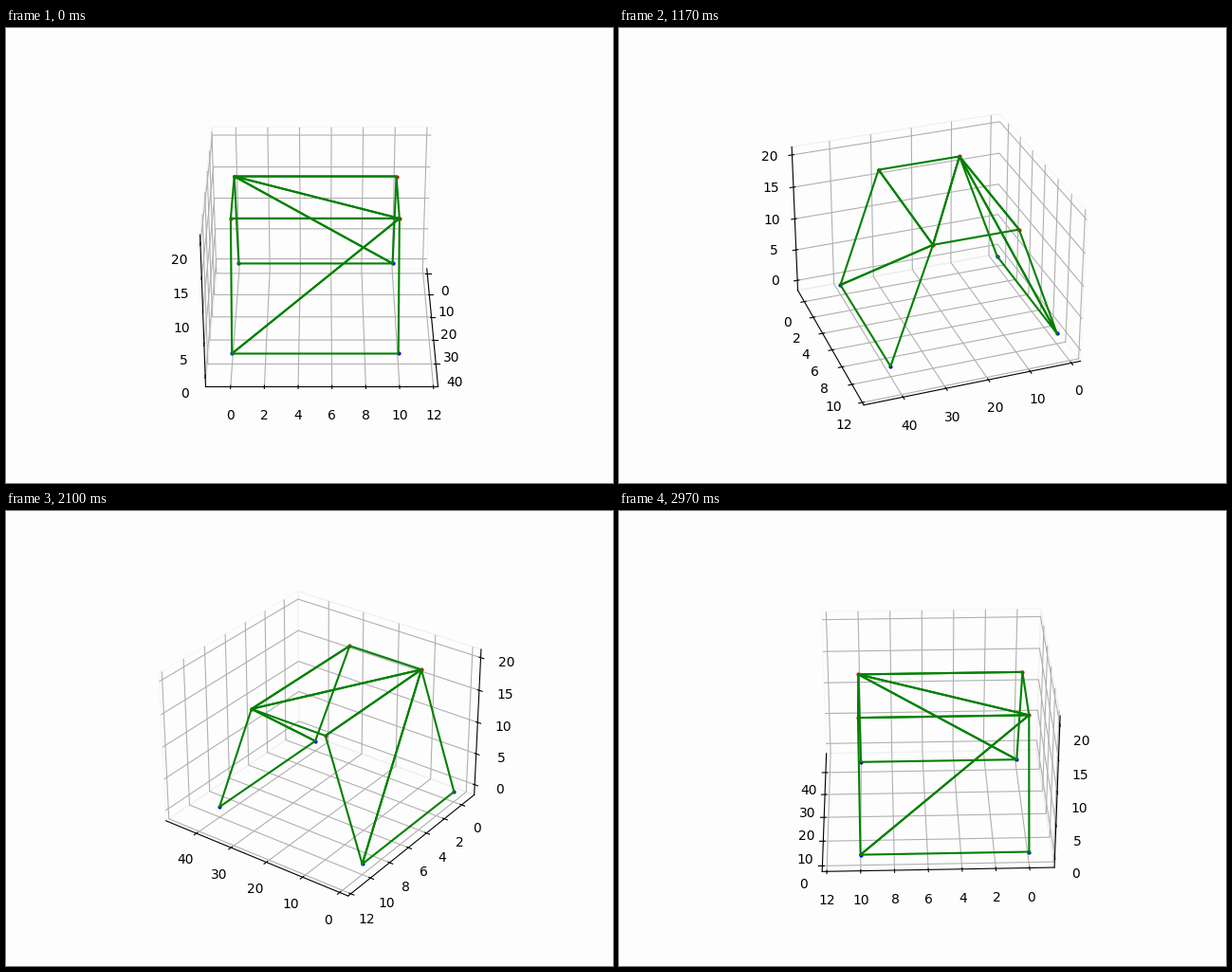
A matplotlib script for the animation above (3 s loop, 640 px wide and 480 px high).

```python
import numpy as np
import matplotlib.pyplot as plt
from matplotlib.animation import FuncAnimation

FRAMES = 100
SPAN, WIDTH, SIDE = 40, 10, 20
HEIGHT = SIDE * np.sin(np.pi / 3)
BACK = "#fdfdfd"

# Truss nodes as (x, y, z): floor ends and roof corners
floor = [(0, 0, 0), (0, WIDTH, 0), (SPAN, 0, 0), (SPAN, WIDTH, 0)]
roof = [(x, y, HEIGHT) for x in (SIDE / 2, SPAN - SIDE / 2) for y in (0, WIDTH)]
nodes = np.array(floor + roof, float)

# Triangles of the folded shell, as node indices
triangles = [(0, 1, 4), (1, 5, 4), (4, 5, 7), (4, 7, 6), (6, 7, 2), (7, 3, 2)]

fig = plt.figure(figsize=(6.4, 4.8), dpi=100, facecolor=BACK)
ax = fig.add_subplot(projection="3d", facecolor=BACK)


def padded(top, low=-1.2):
    """Limits from low to 1.2 * top, widened by 1/48 on each side."""
    high = 1.2 * top
    pad = (high - low) / 48
    return low - pad, high + pad


ax.plot(*nodes[:4].T, "bo", ms=2)
ax.plot(*nodes[4:].T, "ro", ms=2)
for tri in triangles:
    ax.plot(*nodes[list(tri) + [tri[0]]].T, color="green", lw=1.5)

ax.set_xlim(*padded(SPAN))
ax.set_ylim(*padded(WIDTH))
ax.set_zlim(*padded(HEIGHT))
for axis in (ax.xaxis, ax.yaxis, ax.zaxis):
    axis.pane.set_fill(False)


def update(i):
    ax.view_init(elev=30, azim=180 * i / FRAMES)
    return []


anim = FuncAnimation(fig, update, frames=FRAMES, interval=30,
                     repeat=True, repeat_delay=0, blit=False)
plt.show()
```
